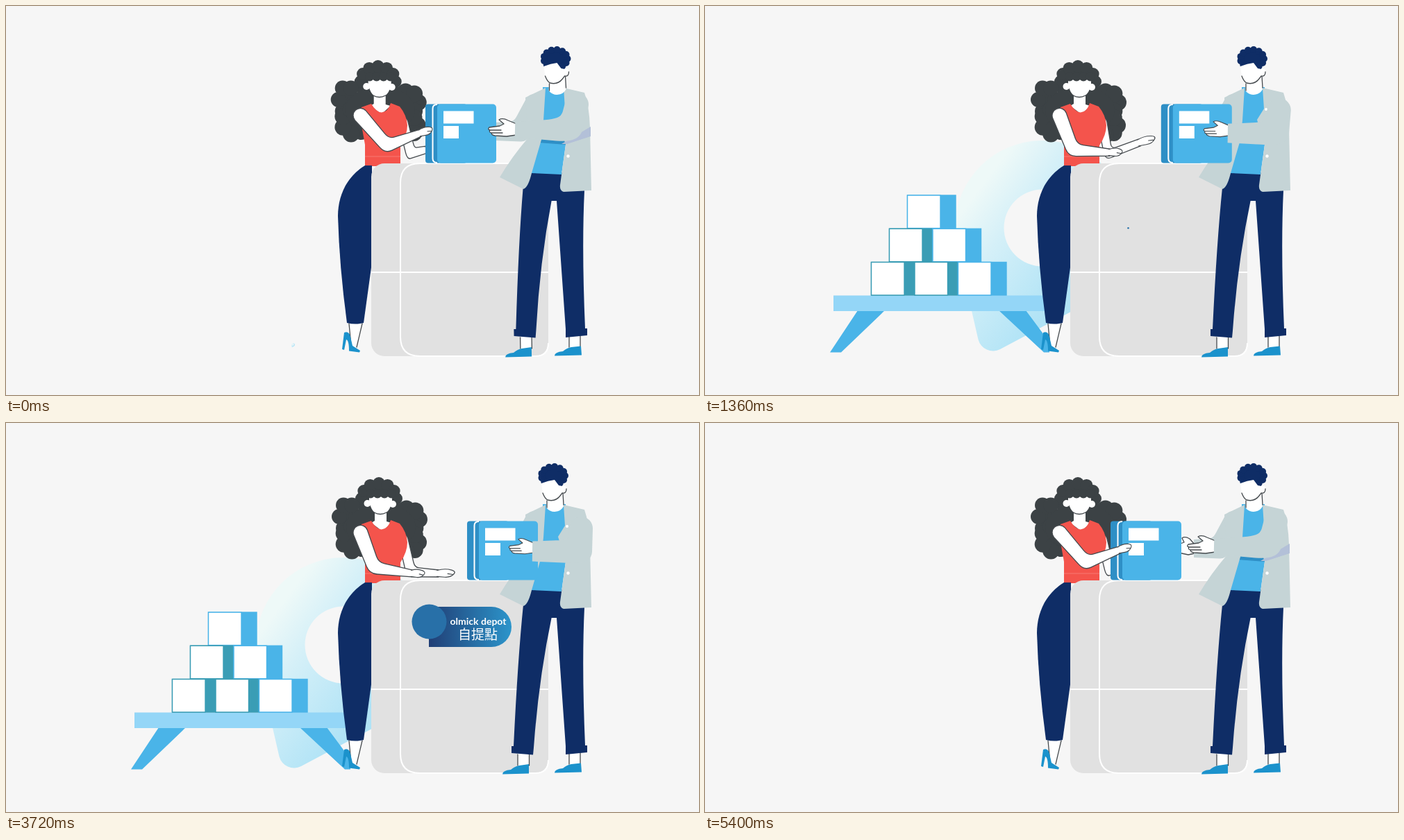
An HTML page for the animation above (5.44 s loop, 998 px wide and 561 px high).

```html
<!DOCTYPE html>
<html lang="en">
<head>
<meta charset="utf-8">
<title>Parcel hand-over</title>
<style>
  html, body { margin: 0; width: 100%; height: 100%; overflow: hidden; background: #f6f6f6; }
  svg { display: block; width: 100vw; height: 100vh; }
  .navy { fill: #0f2d66; }
  .hair { fill: #3c4245; }
  .sky { fill: #4ab4e8; }
  .deep { fill: #2e8fc6; }
  .shoe { fill: #1b92cc; }
  .coat { fill: #c5d4d6; }
  .skin { fill: #fff; stroke: #454a4e; stroke-width: 1.3; stroke-linejoin: round; stroke-linecap: round; }
  .white { fill: #fff; }
  .line { fill: none; stroke: #fff; stroke-width: 2; }
  .ink { fill: none; stroke: #454a4e; stroke-width: 1.3; stroke-linecap: round; }
  .sign { fill: #fff; text-anchor: middle; }
</style>
</head>
<body>
<svg viewBox="0 0 998 561" preserveAspectRatio="none">
  <defs>
    <linearGradient id="mist" gradientUnits="userSpaceOnUse" x1="375" y1="290" x2="524" y2="402">
      <stop offset="0" stop-color="#eef9f8"/><stop offset=".35" stop-color="#d5f0f8"/><stop offset="1" stop-color="#b0e3f6"/>
    </linearGradient>
    <linearGradient id="plate" gradientUnits="userSpaceOnUse" x1="600" y1="0" x2="728" y2="0">
      <stop offset="0" stop-color="#20386f"/><stop offset="1" stop-color="#2c95cb"/>
    </linearGradient>
    <clipPath id="leftSide"><rect width="496" height="561"/></clipPath>
    <clipPath id="plateClip"><path id="plateClipPath"/></clipPath>
  </defs>

  <path id="marker" fill="url(#mist)" fill-rule="evenodd"
    d="M363 348A126 126 0 1 1 545.5 431L425 495A22 22 0 0 1 393.5 481ZM430.5 320a55.5 55.5 0 1 0 111 0a55.5 55.5 0 1 0 -111 0Z"/>

  <g clip-path="url(#leftSide)"><g id="table">
    <path class="sky" d="M220 439H259L196 499.500H180ZM423 439H462L507 499.500H488Z"/>
    <rect x="185" y="417.500" width="318" height="22.500" fill="#94d6f7"/>
    <g id="boxes"></g>
  </g></g>

  <!-- woman -->
  <g id="womanHead">
    <g id="womanHair" class="hair"></g>
    <path class="white" d="M531 126H548V142L555 144L542 156L526 144L531 141Z"/>
    <circle class="white" cx="520.5" cy="116" r="5"/><circle class="white" cx="557" cy="117" r="5"/>
    <path class="white" d="M523 102V112Q526 131 539 132Q553 131 556 112V102Z"/>
    <path class="ink" d="M530 129Q539 134 548 129"/>
    <g id="fringe" class="hair"></g>
  </g>
  <path id="backArm" class="skin"/><path id="backHand" class="skin"/>
  <path d="M526 141Q533 153 541 153.5Q550 153 554 140L567 145Q577 157 578 172Q578 186 568 201V231H517V200L512 172Q508 155 512 146Z" fill="#f4544c"/>
  <path d="M517 217H568" stroke="#f77972"/>
  <path class="white" d="M494 456L498 492L506 493L513 456Z"/>
  <path class="ink" d="M494 458L497 490M513 458L505 492"/>
  <path class="navy" d="M517 230C490 246 478 275 478 303Q480 375 491 457Q503 460 515 457L527 370V230Z"/>
  <path class="shoe" d="M487 471Q494 468 496 477L499 490L510 497L509 499.5L494 497.5Q494 482 490 481L487 496L484 495Z"/>

  <!-- counter -->
  <rect x="526" y="227" width="255" height="278" rx="19" fill="#e1e1e1"/>
  <path class="line" d="M526 384H781M781 246Q781 227 762 227H596Q568 227 568 255V477Q568 505 596 505H762Q781 505 781 486"/>

  <path id="platePath" fill="url(#plate)"/>
  <g class="sign" clip-path="url(#plateClip)">
    <text x="680" y="290.500" font-family="Lato, sans-serif" font-weight="700" font-size="14">olmick depot</text>
    <text lang="zh-Hant" x="679.5" y="312" font-family="'Noto Sans CJK TC', 'Noto Sans CJK', sans-serif" font-weight="500" font-size="19">自提點</text>
  </g>
  <circle id="badge" cx="609.5" cy="286.5" r="25" fill="#2870a8"/>

  <!-- man -->
  <path class="skin" d="M705 175L698 167Q691 163 687 166L690 172L682 175V187L696 190L705 188Z"/>
  <path id="farSleeve" class="coat"/>
  <path class="white" d="M811 474H827V494H811Z"/>
  <path class="ink" d="M811 476V492M827 476V492"/>
  <path class="shoe" d="M790 504.5Q790 499 802 498Q808 493 814 492L828 490.5L829 503.5Z"/>
  <g id="frontLeg">
    <path class="white" d="M737 476H754V496H737Z"/>
    <path class="ink" d="M737 478V494M753.5 478V494"/>
    <path class="shoe" d="M715 506.5Q715 501 727 500Q733 495 739 494L753 492V505.5Z"/>
    <path class="navy" d="M745 262Q737 340 731 466L728 466V476L759 478.5L760 468Q767 370 786 279V262Z"/>
  </g>
  <path class="navy" d="M757 238L745 264V281H793L806 466V478L837 475V465L834 465Q829 350 833 266L800 240Z"/>
  <path class="sky" d="M773 117H806V200L800 243L756 241L773 180Z"/>
  <path class="deep" d="M768 192L806 194V200L767 197Z"/>
  <path class="coat" d="M777 118L748 132L752 190Q728 218 711 247L745 264Q752 262 757 241L771 193L774 165Z"/>
  <path class="coat" d="M803 118L833 125Q840 145 841 175L843 266L803 268Q797 266 798 258L806 200L795 164L805 148Z"/>
  <g id="manHead">
    <path class="white" d="M779 105L778 122Q783 128 790 128Q800 127 803 120L801 100Z"/>
    <path class="ink" d="M779 112V122M802 101L803 118"/>
    <g id="manHair" class="navy"></g>
    <path class="white" d="M771 87Q781 83 790 82L796 90L801 91Q808 89 807 96Q806 102 801 101Q795 111 785 112Q776 111 773 101Z"/>
    <path class="ink" d="M773 101Q776 109 780 111Q791 114 798 105L801 101Q807 102 807 95"/>
  </g>
  <circle class="white" cx="808" cy="149" r="2"/><circle class="white" cx="809.5" cy="216.5" r="2.2"/>

  <g id="book">
    <rect class="deep" y="141.5" width="60" height="85" rx="4"/>
    <path class="line" d="M17 142Q10.5 142 10.5 148V220Q10.5 226 17 226"/>
    <rect class="sky" x="17" y="141.5" width="85" height="85" rx="5"/>
    <path class="white" d="M26 151.5H69.5V169.5H26ZM26 173H48V191H26Z"/>
  </g>

  <path id="fold" fill="#b3c0d8" d="M800 199L842 174V188L808 199Z"/>
  <path id="manHand" class="skin"
    d="M2 -8L-10 -13Q-18 -17 -23 -14L-16 -8L-22 -5L-37 -3Q-40 0 -36 1Q-38 4 -34 5Q-34 8 -29 9L-12 10L2 8M-36 1L-20 1M-34 5L-18 5"/>
  <path id="nearSleeve" class="coat"/>
  <path id="frontArm" class="skin"/><path id="frontHand" class="skin"/>
</svg>

<script>
const LOOP = 5440;
const $ = id => document.getElementById(id);
const set = (id, name, value) => $(id).setAttribute(name, value);
const repeat = (n, fn) => Array.from({ length: n }, (_, i) => fn(i)).join('');

// A curly mass: an ellipse with round curls spaced along its rim.
const curls = (cx, cy, rx, ry, n, r) => `<ellipse cx="${cx}" cy="${cy}" rx="${rx}" ry="${ry}"/>`
  + repeat(n, i => {
    const a = 2 * Math.PI * i / n;
    return `<circle cx="${cx + (rx - 1) * Math.cos(a)}" cy="${cy + (ry - 1) * Math.sin(a)}" r="${r}"/>`;
  });
$('womanHair').innerHTML = curls(537, 109, 26, 23, 12, 9) + curls(492, 135, 13, 20, 6, 11)
  + curls(502, 167, 18, 19, 7, 12) + curls(580, 139, 16, 17, 7, 12) + curls(580, 172, 15, 15, 7, 12)
  + '<ellipse cx="540" cy="150" rx="50" ry="34"/>';
$('fringe').innerHTML = repeat(4, i => `<circle cx="${525 + 10 * i}" cy="102" r="6.5"/>`);
$('manHair').innerHTML = curls(788, 76, 18, 14, 13, 5);

// Cartons stacked in rows of one, two and three; each row's last one shows a wider side.
$('boxes').innerHTML = repeat(3, row => repeat(row + 1, i => {
  const x = 291.5 - 26 * row + 62.5 * i, y = 273 + 48.25 * row;
  const [side, color] = i === row ? [22, '#4ab4e8'] : [15.5, '#3a9db5'];
  return `<g stroke="${color}" stroke-width="1.4">
    <rect x="${x}" y="${y}" width="${47.5 + side}" height="47.5" fill="${color}"/>
    <rect x="${x}" y="${y}" width="47.5" height="47.5" fill="#fff"/></g>`;
}));

const ease = u => .5 - .5 * Math.cos(Math.PI * Math.min(1, Math.max(0, u)));
const span = (t, from, to) => ease((t - from) / (to - from));
// Rises to 1 in the first interval, falls back to 0 in the second.
const pulse = (t, a, b, c, d) => span(t, a, b) - span(t, c, d);
const mix = (p, q, u) => p.map((v, i) => v + (q[i] - v) * u);

// Tapered two-bone limb: joints are [x, y, half width].
function limb(a, b, c, bend) {
  const normal = (p, q) => {
    const dx = q[0] - p[0], dy = q[1] - p[1], d = Math.hypot(dx, dy);
    return [dy / d, -dx / d];
  };
  const n1 = normal(a, b), n2 = normal(b, c);
  const sum = [n1[0] + n2[0], n1[1] + n2[1]];
  const k = Math.min(1, 2 / (sum[0] ** 2 + sum[1] ** 2));
  const side = s => {
    const off = ([x, y, w], n) => [x + n[0] * w * s, y + n[1] * w * s];
    return [off(a, n1), off(b, sum.map(v => v * k)), off(c, n2)];
  };
  const [[A, B, C], [F, E, D]] = [side(1), side(-1)];
  return `M${A}L${mix(A, B, 1 - bend)}Q${B} ${mix(B, C, bend)}L${C}L${D}`
    + `L${mix(D, E, 1 - bend)}Q${E} ${mix(E, F, bend)}L${F}A${a[2]} ${a[2]} 0 0 1 ${A}Z`;
}

// Woman's poses: front elbow and wrist, then back elbow and wrist.
const HOLD = [549, 202, 597, 183, 583, 213, 606, 207];
const REACH = [530, 208, 583, 211, 581, 214, 626, 196];
const REST = [530, 209, 585, 217, 583, 215, 623, 217];
// Man's near arm: shoulder, elbow, wrist, cuff half width.
const OFFER = [822, 142, 812, 180, 733, 178, 11];
const TAKE = [828, 152, 827, 186, 758, 185, 14.5];

const HAND = 'M-2 -5Q8 -9 17 -6Q23 -4 20 0Q16 6 8 5.5L-2 5M12 0L19 1';
set('frontHand', 'd', HAND);
set('backHand', 'd', HAND);
set('farSleeve', 'd', limb([761, 141, 14], [741, 181, 15], [704, 181, 13], .2));

function womanArm(name, shoulder, [ex, ey, wx, wy], width, size) {
  set(name + 'Arm', 'd', limb(shoulder, [ex, ey, width], [wx, wy, 5], .18));
  const angle = Math.atan2(wy - ey, wx - ex) * 180 / Math.PI * .6;
  set(name + 'Hand', 'transform', `translate(${wx} ${wy}) rotate(${angle}) scale(${size} .9)`);
}

// Slides in past its place, settles, and later slides out again.
function tableOffset(t) {
  if (t < 340) return 330 - 359 * ease(t / 340);
  if (t < 650) return -29 * (1 - (t - 340) / 310) ** 2;
  return 330 * span(t, 4684, 5284);
}

const scaleAt = (x, y, s) => `translate(${x} ${y}) scale(${s}) translate(${-x} ${-y})`;
const shift = x => `translate(${x} 0)`;

function draw(t) {
  set('marker', 'transform', scaleAt(412, 492, Math.max(0, .02 + .98 * span(t, 0, 1000) - span(t, 4730, 5390))));
  set('table', 'transform', shift(tableOffset(t)));
  set('book', 'transform', shift(604 + 60 * span(t, 112, 1724) - 80 * span(t, 3720, 5340)));

  const lowered = mix(mix(HOLD, REACH, span(t, 520, 1280)), REST, span(t, 1280, 1900));
  const pose = mix(lowered, HOLD, span(t, 3720, 4640));
  womanArm('front', [510.5, 158, 10.5], pose.slice(0, 4), 9, .85);
  womanArm('back', [572, 168, 7], pose.slice(4), 7, 1.1);

  const take = pulse(t, 520, 1724, 3720, 4800);
  const [sx, sy, ex, ey, wx, wy, cuff] = mix(OFFER, TAKE, take);
  set('nearSleeve', 'd', limb([sx, sy, 17], [ex, ey, 17], [wx, wy, cuff], .35));
  set('manHand', 'transform', `translate(${wx} ${wy - 5 * take}) scale(${1 - .12 * take})`);
  set('fold', 'transform', shift(-4 * take));

  const lean = 1 - span(t, 0, 480), skew = 4 * lean / 220;
  set('womanHead', 'transform', shift(-1.3 * lean));
  set('manHead', 'transform', shift(3.5 * lean));
  set('frontLeg', 'transform', `matrix(1 0 ${skew} 1 ${-skew * 281} 0)`);

  set('badge', 'transform', scaleAt(609.5, 322, .05 + .95 * pulse(t, 1360, 1880, 4240, 4760)));
  set('badge', 'visibility', t >= 1320 && t < 4960 ? 'visible' : 'hidden');

  const width = 119 * pulse(t, 2240, 3040, 3720, 4240);
  const r = Math.min(29, width), end = 609 + width - r;
  const plate = width > 0 ? `M609 265H${end}A${r} 29 0 0 1 ${end} 323H609Z` : 'M0 0';
  set('platePath', 'd', plate);
  set('plateClipPath', 'd', plate);
}

function tick() {
  draw(performance.now() % LOOP);
  requestAnimationFrame(tick);
}
tick();
</script>
</body>
</html>
```
